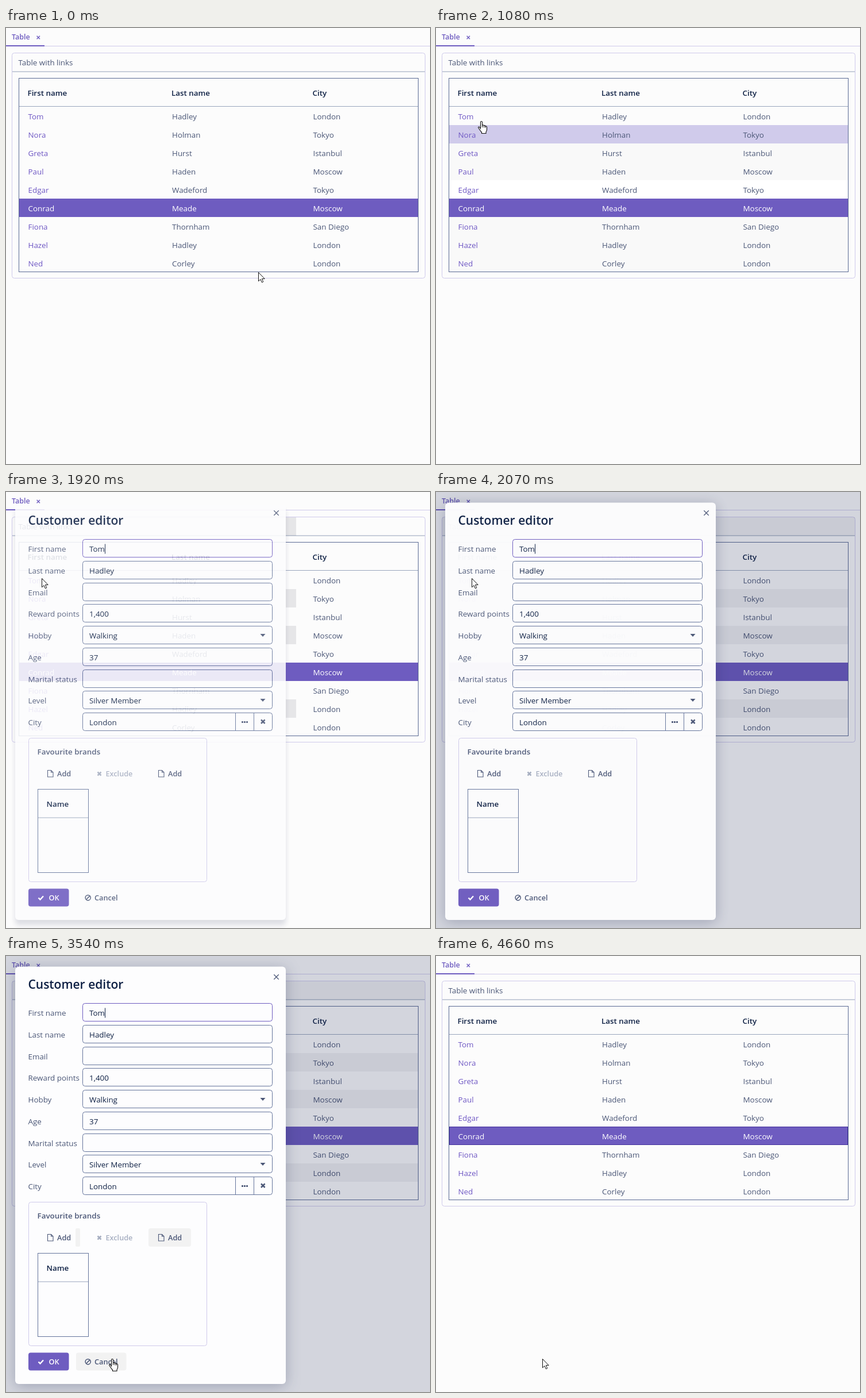
These frames come from a looping animation (738 by 759 pixels, 5060 ms). An HTML page:

```html
<!DOCTYPE html>
<html lang="en">
<head>
<meta charset="utf-8">
<title>Table with links</title>
<style>
html, body { margin: 0; width: 100%; height: 100%; overflow: hidden; background: #fcfcfc; }
svg { display: block; width: 738px; height: 759px; font: 13.4px "Open Sans", sans-serif; }
</style>
</head>
<body>
<svg id="stage" viewBox="0 0 738 759"></svg>
<script>
const LOOP = 5060;
const PURPLE = '#6e5cc0', TEXT = '#4b5777', DARK = '#0e2044', EDGE = '#65759c', PALE = '#cfcaeb';
const HOVER = '#d0cbeb', TRAIL = '#f2f2f2', FADED = '#f9f9f9';

const people = [
  ['Tom', 'Hadley', 'London'], ['Nora', 'Holman', 'Tokyo'], ['Greta', 'Hurst', 'Istanbul'],
  ['Paul', 'Haden', 'Moscow'], ['Edgar', 'Wadeford', 'Tokyo'], ['Conrad', 'Meade', 'Moscow'],
  ['Fiona', 'Thornham', 'San Diego'], ['Hazel', 'Hadley', 'London'], ['Ned', 'Corley', 'London']
];
const SELECTED = 5;
const fields = [
  ['First name', 'Tom'], ['Last name', 'Hadley'], ['Email', ''], ['Reward points', '1,400'],
  ['Hobby', 'Walking', true], ['Age', '37'], ['Marital status', ''],
  ['Level', 'Silver Member', true], ['City', 'London']
];

// [start ms, pointer kind, x, y]
const steps = [
  [0, 'arrow', 439, 425], [690, 'hand', 376, 377], [810, 'hand', 258, 291], [960, 'hand', 150, 220],
  [1080, 'hand', 79, 162], [1200, 'hand', 62, 150], [1480, 'hand', 62, 150], [1920, 'arrow', 62, 150],
  [2070, 'arrow', 62, 150], [2220, 'arrow', 62, 150], [2370, 'arrow', 72, 162], [2490, 'arrow', 110, 195],
  [2650, 'beam', 169, 247], [2780, 'beam', 185, 300], [2930, 'beam', 212, 364], [3080, 'arrow', 233, 455],
  [3240, 'arrow', 221, 628], [3390, 'arrow', 186, 690], [3540, 'hand', 185, 701], [4100, 'hand', 185, 701],
  [4380, 'hand', 185, 701], [4500, 'hand', 185, 701], [4660, 'arrow', 185, 701]
];

const text = (s, x, y, fill = TEXT, weight = 400, size = 13.4) =>
  `<text x="${x}" y="${y}" fill="${fill}" font-weight="${weight}" font-size="${size}">${s}</text>`;
const fillBox = (x, y, w, h, fill, r = 0, more = '') =>
  `<rect x="${x}" y="${y}" width="${w}" height="${h}" rx="${r}" fill="${fill}" ${more}/>`;
const frame = (x, y, w, h, stroke, r = 0, fill = 'none') =>
  fillBox(x + .5, y + .5, w - 1, h - 1, fill, r, `stroke="${stroke}"`);
const path = (d, stroke, width = 1, fill = 'none') =>
  `<path d="${d}" stroke="${stroke}" stroke-width="${width}" fill="${fill}"/>`;
const cross = (x, y, r, color, width) =>
  path(`M${x - r} ${y - r}l${2 * r} ${2 * r}m0 ${-2 * r}l${-2 * r} ${2 * r}`, color, width);
const rowTop = i => Math.round(137 + 32.06 * i);

function rowFills(t) {
  const fills = {};
  const paint = (color, ...rows) => rows.forEach(r => fills[r] = color);
  if (t >= 690 && t < 810) paint(HOVER, 8);
  if (t >= 810 && t < 1920) paint(FADED, 6, 7, 8);
  if (t >= 960 && t < 1080) { paint(HOVER, 3); paint(TRAIL, 4); }
  if (t >= 1080 && t < 1920) { paint(FADED, 2, 3); paint('#fff', 4); }
  if (t >= 1080 && t < 1200) paint(HOVER, 1);
  if (t >= 1200 && t < 1920) { paint(HOVER, 0); paint(FADED, 1); }
  return fills;
}

function page(t) {
  const fills = rowFills(t);
  let out = fillBox(0, 0, 738, 759, '#fcfcfc')
    + fillBox(0, 31, 738, 1, PALE) + fillBox(0, 30, 67, 2, PURPLE)
    + text('Table', 10, 20, PURPLE, 600, 12.5) + cross(56.3, 16.5, 2.7, PURPLE, 1.4)
    + frame(10, 43, 720, 393, PALE, 4) + fillBox(11, 75.5, 718, 1, '#94a1ba')
    + text('Table with links', 21.5, 65);
  if (t >= 690 && t < 810) out += fillBox(23, 377, 694, 16, TRAIL);
  people.forEach((person, i) => {
    const y = rowTop(i), on = i === SELECTED;
    const fill = on ? PURPLE : fills[i];
    if (fill) out += fillBox(23, y, 694, Math.min(32, 424 - y), fill);
    person.forEach((s, c) =>
      out += text(s, [38.5, 289, 534.5][c], y + 21.5, on ? '#fff' : c ? TEXT : '#6f58c4'));
  });
  if (t >= 1480 && t < 1920 || t >= 4660) out += frame(23, 297, 694, 32, '#43329c');
  // Striped bands under the veil
  if (t >= 1920 && t < 4660) {
    const early = t < 2070, shade = `rgba(20,20,40,${early ? .09 : .05})`;
    const band = (y, x, w) => out += fillBox(early ? 487 : x, y, early ? 18 : w, 32, shade);
    band(44, 11, 718);
    [1, 3, 7].forEach(i => band(rowTop(i), 23, 694));
  }
  return out + frame(22, 87, 696, 338, '#5a6a94') + fillBox(23, 136, 694, 1, '#9aa6bd')
    + text('First name', 37.5, 118, DARK, 600) + text('Last name', 288, 118, DARK, 600)
    + text('City', 533.5, 118, DARK, 600);
}

const sheet = x => path(`M${x + .5} 484.5h6l3.5 3.5v8h-9.5zm6 0v3.5h3.5`, TEXT, 1.1);
const label = (s, x, y, color = TEXT) => text(s, x, y, color, 600, 12.7);

function dialog(t) {
  const early = t < 2070, top = early ? 22 : 18.5;
  const opacity = early ? .88 : t < 2220 ? .97 : 1;
  const shadow = early ? '0 9px 4px rgba(40,45,80,.16)' : '0 4px 12px rgba(24,36,80,.28)';
  let out = `<g opacity="${opacity}">`
    + fillBox(16, top, 471, 745 - top, '#fdfdfe', 6, `style="filter:drop-shadow(${shadow})"`)
    + text('Customer editor', 38.5, 57, DARK, 600, 21) + cross(470.5, 36.5, 4.2, TEXT, 1.3);
  fields.forEach(([name, value, menu], i) => {
    const y = Math.round(82.2 + 37.75 * i);
    const focus = !i && t < 4380;
    out += text(name, 38.5, y + 22) + frame(133, y, 331, 32, focus ? PURPLE : EDGE, 4)
      + text(value, 145, y + 22, DARK);
    if (menu) out += path(`M442.5 ${y + 14}h9l-4.5 5z`, 'none', 0, TEXT);
  });
  out += path('M399.5 384.5v31M431.5 384.5v31', EDGE)
    + [410, 414, 418].map(x => fillBox(x, 399, 3, 3, TEXT, .8)).join('')
    + cross(447.3, 399.7, 3.3, TEXT, 2.6);
  // Blinking caret
  if (t < 2370 || t >= 2650 && t < 3080 || t >= 3540 && t < 4100)
    out += fillBox(172, 90.5, 1, 17, DARK);

  out += frame(39, 428, 311, 251, PALE, 4) + text('Favourite brands', 54.5, 457, TEXT, 600);
  if (t >= 3540) out += fillBox(121, 474, 8, 32, TRAIL, 2) + fillBox(248, 474, 74, 32, TRAIL, 4);
  out += sheet(72) + label('Add', 89, 495) + sheet(265) + label('Add', 282, 495)
    + cross(162.5, 490.5, 3, '#a6aec1', 2.5) + label('Exclude', 173.5, 495, '#a6aec1')
    + frame(55, 517, 89, 146, EDGE) + fillBox(56, 566.5, 87, 1, '#9aa6bd')
    + text('Name', 70.5, 548, DARK, 600)
    + fillBox(39, 690.5, 70.5, 31, PURPLE, 4) + path('M56.5 706.5l3 3 5.5-6', '#fff', 2.4)
    + label('OK', 74.5, 711, '#fff');
  if (t >= 4380) {
    out += fillBox(122.5, 691.5, 86.5, 29.5, t < 4500 ? '#c8c8c8' : '#a3a3a3', 4,
      'stroke="#c9c9ce" stroke-width="1.5"');
  } else if (t >= 3540) out += fillBox(122, 690.5, 87.5, 31, TRAIL, 4);
  return out + `<circle cx="142.7" cy="706.3" r="4.6" fill="none" stroke="${TEXT}" stroke-width="1.5"/>`
    + path('M139.5 709.5l6.4-6.4', TEXT, 1.5) + label('Cancel', 154, 711) + '</g>';
}

const pointers = {
  arrow: path('M.5.5V15.8L4 12.6 6.4 17.9 8.8 16.8 6.4 11.6H11.2Z', '#111', 1, '#fff'),
  hand: '<g transform="translate(-6)">' + path('M4.5 13V2Q4.5.5 6 .5Q7.5.5 7.5 2V8Q7.5 6.8 8.9 6.8Q10.2 6.9 10.2 8.3'
    + 'Q10.5 7.5 11.6 7.6Q12.9 7.8 12.9 9.3Q13.3 8.6 14.3 8.9Q15.5 9.3 15.5 10.8V15Q15.5 17 14 19V21.5H6.5V19.5'
    + 'Q4.5 17.5 3 15L.8 11.8Q.3 10.4 1.5 10Q2.5 9.9 4.5 13Z', '#111', 1.1, '#fff')
    + path('M7.5 8v3M10.2 8.3v3M12.9 9.3v2.5', '#111') + '</g>',
  beam: path('M-3-7.5h2.5l.5 1 .5-1H3M0-6.5v13M-3 7.5h2.5l.5-1 .5 1H3', '#111', 1.2)
};

const stage = document.getElementById('stage');
let shown;
function tick(now) {
  const t = now % LOOP;
  const step = steps.filter(s => s[0] <= t).pop();
  if (step !== shown) {
    shown = step;
    const [at, kind, x, y] = step;
    let out = page(at);
    if (at >= 1920 && at < 4660) {
      if (at >= 2070) out += fillBox(0, 0, 738, 759, 'rgba(24,36,80,.18)');
      out += dialog(at);
    }
    stage.innerHTML = out + `<g transform="translate(${x} ${y})">${pointers[kind]}</g>`;
  }
  requestAnimationFrame(tick);
}
tick(0);
</script>
</body>
</html>
```
